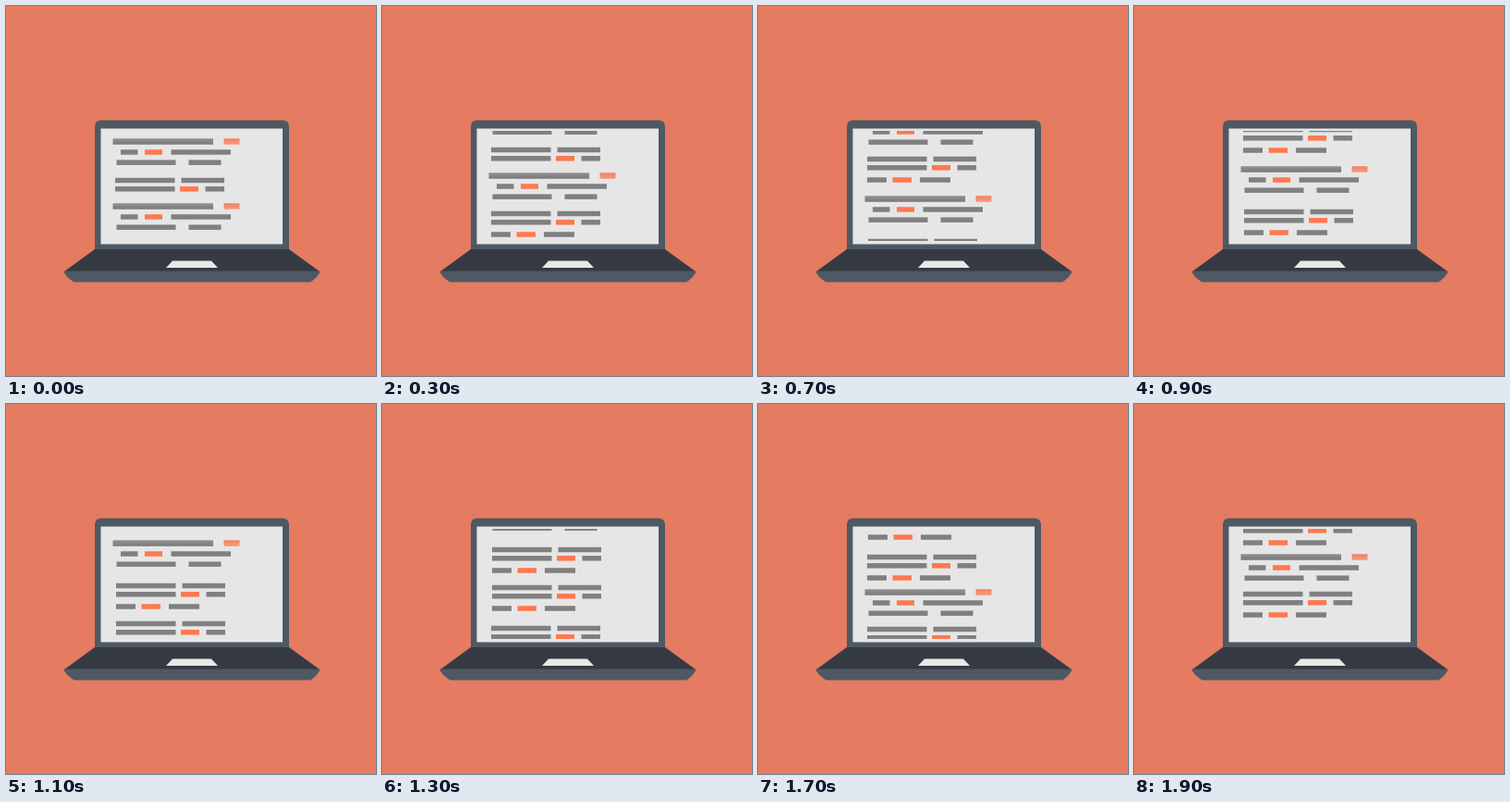
Animation of 400x400 px, one loop 2000 ms. Source, as an HTML page:

```html
<!DOCTYPE html>
<html lang="en">
<head>
<meta charset="utf-8">
<title>Scrolling code</title>
<style>
  html, body { margin: 0; width: 100%; height: 100%; overflow: hidden; background: #e57b60; }
  svg { display: block; width: 100%; height: 100%; }
</style>
</head>
<body>
<svg viewBox="0 0 400 400">
  <defs>
    <clipPath id="view"><rect x="103" y="135" width="196" height="119"/></clipPath>
    <linearGradient id="softGray" x2="0" y2="1">
      <stop stop-color="#929292"/><stop offset="1" stop-color="#797979"/>
    </linearGradient>
    <linearGradient id="softOrange" x2="0" y2="1">
      <stop stop-color="#f58161"/><stop offset="1" stop-color="#f39a80"/>
    </linearGradient>
  </defs>
  <rect width="400" height="400" fill="#e57b60"/>
  <path d="M96 264V130.5Q96 123.5 103 123.5H299Q306 123.5 306 130.5V264Z" fill="#4e5963"/>
  <rect x="102.5" y="132.5" width="196.5" height="125" fill="#e6e6e6"/>
  <path d="M96 263H306L339 287H63Z" fill="#363a42"/>
  <path d="M63 286.5H339V288.5Q335 295 329 298.5H74Q67 295 63 288.5Z" fill="#4e5963"/>
  <path d="M180 275.5H222L229 283H173Z" fill="#e6e9e5"/>
  <g clip-path="url(#view)"><g id="code"></g></g>
</svg>
<script>
const GRAY = "#808080", ORANGE = "#ff7850";
const SOFT_GRAY = "url(#softGray)", SOFT_ORANGE = "url(#softOrange)";
const code = document.getElementById("code");

function bar(left, right, y, fill = GRAY, height = 5.5) {
  const rect = document.createElementNS("http://www.w3.org/2000/svg", "rect");
  const attributes = { x: left, y: y - height / 2, width: right - left, height, fill };
  for (const name in attributes) rect.setAttribute(name, attributes[name]);
  code.append(rect);
}

function wideBlock(y) {
  bar(115.5, 224, y, SOFT_GRAY, 6.5);
  bar(235.5, 252.5, y, SOFT_ORANGE, 6.5);
  bar(124, 142.5, y + 11.5);
  bar(150, 169, y + 11.5, ORANGE);
  bar(178.5, 243, y + 11.5);
  bar(119.5, 183.5, y + 22.7);
  bar(197.5, 232.5, y + 22.7);
}

function narrowBlock(y, x = 118, lines = 3) {
  bar(x, x + 64.5, y);
  bar(x + 71.5, x + 118, y);
  bar(x, x + 64.5, y + 9.3);
  bar(x + 70, x + 90, y + 9.3, ORANGE);
  bar(x + 97.5, x + 118, y + 9.3);
  if (lines < 3) return;
  bar(x, x + 21, y + 22.5);
  bar(x + 27.5, x + 48, y + 22.5, ORANGE);
  bar(x + 57, x + 90, y + 22.5);
}

[146.5, 216.5, 300.5, 469.5].forEach(y => wideBlock(y));
narrowBlock(188.5, 118, 2);
narrowBlock(257.5);
narrowBlock(346.5, 119);
narrowBlock(387.5, 119);
narrowBlock(431.5);
narrowBlock(509.5);

// Scroll positions: [time in ms, distance in px]
const scrollKeys = [[0, 0], [300, 33], [600, 76], [900, 124], [1100, 150], [1500, 228], [1900, 304]];

function scrollAt(time) {
  const next = Math.max(1, scrollKeys.findIndex(([t]) => t >= time));
  const [t0, y0] = scrollKeys[next - 1], [t1, y1] = scrollKeys[next];
  return y0 + (y1 - y0) * (time - t0) / (t1 - t0);
}

function draw() {
  const time = Math.floor(performance.now() % 2000 / 100) * 100;
  code.setAttribute("transform", `translate(0 ${-Math.round(scrollAt(time))})`);
  requestAnimationFrame(draw);
}
draw();
</script>
</body>
</html>
```
